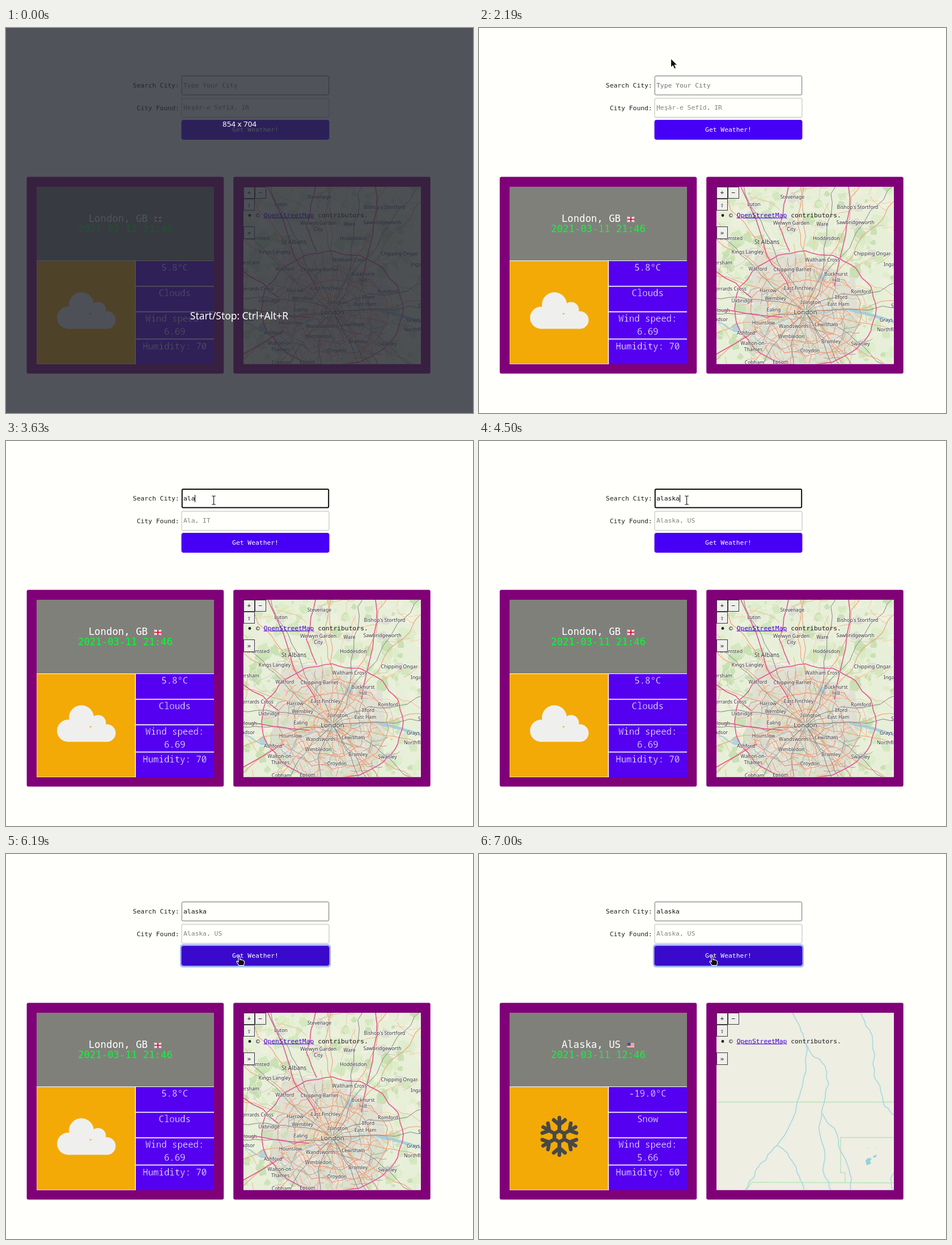
These frames come from a looping animation (824 by 679 pixels, 8 s). An HTML page:

```html
<!DOCTYPE html>
<html lang="en">
<head>
<meta charset="utf-8">
<title>City weather</title>
<style>
html, body { margin: 0; width: 100%; height: 100%; overflow: hidden; background: #fffffc; }
svg { display: block; }
#stage { width: 824px; height: 679px; font: 11.33px "DejaVu Sans Mono", monospace; fill: #1c1c1c; }
text { white-space: pre; }
.head { font-size: 17.33px; fill: #fff; }
/* The thin outline in the cell colour slims the letters */
.cell { font: 300 15.67px "Noto Sans Mono", "DejaVu Sans Mono", monospace; fill: #fff; stroke: #5500f0; stroke-width: .35px; text-anchor: middle; }
.place { font: 8.7px "Noto Sans", sans-serif; fill: #333; stroke: #fff; stroke-opacity: .6; stroke-width: 1.6px; paint-order: stroke; }
.hint { font-family: Ubuntu, "Noto Sans", sans-serif; fill: #fff; text-anchor: middle; }
.line { fill: none; stroke-linejoin: round; stroke-linecap: round; }
.mid { text-anchor: middle; }
.end { text-anchor: end; }
</style>
</head>
<body>
<svg id="stage" viewBox="0 0 824 679">
  <rect width="824" height="679" fill="#fffffc"/>

  <text class="end" x="305.7" y="105">Search City:</text>
  <text class="end" x="305.7" y="144.5">City Found:</text>
  <rect id="box" fill="#fffffc" rx="2"/>
  <rect x="310" y="124" width="260" height="33.5" rx="2" fill="#fffffc" stroke="#b9b9b7"/>
  <text id="query" x="313" y="105"></text>
  <text id="found" x="313" y="144" fill="#82827e"></text>
  <rect id="caret" y="95" width="1" height="13" fill="#000"/>
  <rect id="ring" x="308.5" y="160.5" width="263" height="38" rx="4" fill="none" stroke="#a3b4f6" stroke-width="3"/>
  <rect id="button" x="309.5" y="162" width="261" height="35" rx="4"/>
  <text class="mid" x="440" y="183.3" fill="#fff">Get Weather!</text>

  <g fill="#800078">
    <rect x="36.6" y="262.4" width="347.6" height="347" rx="3"/>
    <rect x="401.2" y="262.4" width="347.6" height="347" rx="3"/>
  </g>
  <rect x="54" y="280" width="313" height="313" fill="#fffffc"/>
  <rect x="54" y="280" width="313" height="130" fill="#80807b"/>
  <rect x="54.3" y="411" width="173.4" height="181.4" fill="#f3aa07"/>
  <g fill="#5500f0">
    <rect x="229" y="411" width="138" height="43.7"/>
    <rect x="229" y="456.4" width="138" height="43.2"/>
    <rect x="229" y="501.4" width="138" height="46.3"/>
    <rect x="229" y="549.4" width="138" height="43.6"/>
  </g>
  <text id="city" class="head" x="145.7" y="342"></text>
  <text id="date" class="head" x="127" y="360" style="fill:#00ff32"></text>
  <g id="flagGB">
    <rect x="261.5" y="333" width="12.5" height="9" fill="#c9c3de"/>
    <path d="M262 333l12 9M274 333l-12 9" stroke="#f4e4ea" stroke-width="1.6"/>
    <path d="M268 333v9M261.5 337.5h12.5" stroke="#fff" stroke-width="3.4"/>
    <path d="M268 333v9M261.5 337.5h12.5" stroke="#dc1030" stroke-width="2.2"/>
  </g>
  <g id="flagUS">
    <rect x="261.5" y="333" width="12.5" height="9" fill="#f4e6e6"/>
    <path d="M261.5 334h12.5m-12.5 2.5h12.5m-12.5 2.5h12.5m-12.5 2.5h12.5" stroke="#d84858"/>
    <rect x="261.5" y="333" width="6" height="5" fill="#40509c"/>
  </g>
  <text id="temp" class="cell" x="297.7" y="427.5"></text>
  <text id="sky" class="cell" x="297.7" y="473"></text>
  <text class="cell" x="297.7" y="518">Wind speed:</text>
  <text id="wind" class="cell" x="297.7" y="541"></text>
  <text id="humid" class="cell" x="297.7" y="566.5"></text>
  <g id="cloud" fill="#efefed">
    <circle cx="133" cy="488" r="22"/>
    <circle cx="162.5" cy="497" r="13.8"/>
    <circle cx="109.5" cy="511" r="19.5"/>
    <circle cx="178" cy="515" r="15.5"/>
    <rect x="109" y="505" width="69" height="25.5"/>
  </g>
  <g id="flake" class="line" transform="translate(141.8 498)" stroke="#484846" stroke-width="6.5"></g>

  <rect x="419" y="280" width="313" height="312.5" fill="#fffffc"/>
  <svg id="london" x="419" y="280" width="312.5" height="312.5" viewBox="419 280 312.5 312.5"></svg>
  <svg id="alaska" x="419" y="280" width="312.5" height="312.5" viewBox="419 280 312.5 312.5"></svg>
  <g fill="#efefec" stroke="#3a3a3a">
    <rect x="419.5" y="280.5" width="19" height="20"/>
    <rect x="439.5" y="280.5" width="19" height="20"/>
    <rect x="419.5" y="301.5" width="19" height="20"/>
    <rect x="419.5" y="350.5" width="19" height="21"/>
  </g>
  <g class="mid">
    <text x="429" y="293.5">+</text>
    <text x="449" y="293.5">−</text>
    <text x="429" y="316">⇧</text>
    <text x="429" y="365">»</text>
  </g>
  <circle cx="430" cy="330.5" r="2.4"/>
  <text x="441" y="333.5">© <tspan fill="#4400d8" text-decoration="underline">OpenStreetMap</tspan> contributors.</text>

  <path id="arrow" d="M0 0V15.5L3.6 12.2L6.2 18L9 16.8L6.5 11.2H11.3Z" fill="#111" stroke="#fff"/>
  <g id="beam" class="line">
    <path d="M-3 -7.5H3M-3 7.5H3M0 -7.5V7.5" stroke="#fff" stroke-width="3"/>
    <path d="M-3 -7.5H-1L0 -6.5L1 -7.5H3M-3 7.5H-1L0 6.5L1 7.5H3M0 -6.5V6.5" stroke="#222" stroke-width="1.2"/>
  </g>
  <path id="hand" d="M-1.4 1Q0 -.6 1.4 1V6.5Q3 5.6 4 7Q6 6.2 7 8Q9 8 9 10V13L8 16.5H-.5L-4.5 10.5Q-5 8.5 -3 9L-1.4 10.5Z" fill="#111" stroke="#fff" stroke-width="1.1"/>

  <g id="dim">
    <rect width="824" height="679" fill="rgb(38,40,50)" opacity=".8"/>
    <text class="hint" x="412" y="173.5" font-size="13.4">854 x 704</text>
    <text class="hint" x="411.5" y="514" font-size="17.4">Start/Stop: Ctrl+Alt+R</text>
  </g>
</svg>
<script>
const LOOP = 8000, TURN = Math.PI * 2;
const $ = id => document.getElementById(id);

function set(el, attrs) {
  for (const k in attrs) el.setAttribute(k, attrs[k]);
  return el;
}

function add(parent, tag, attrs, text = "") {
  const el = set(document.createElementNS("http://www.w3.org/2000/svg", tag), attrs);
  el.textContent = text;
  parent.append(el);
  return el;
}

let seed = 77;
function rnd() {
  seed = (seed * 16807) % 2147483647;
  return seed / 2147483647;
}
const spread = r => (rnd() * 2 - 1) * r;

function ellipse(cx, cy, rx, ry, n = 16) {
  return Array.from({ length: n + 1 }, (_, i) =>
    [cx + Math.cos(i / n * TURN) * rx, cy + Math.sin(i / n * TURN) * ry]);
}

// Midpoint displacement, for natural looking roads and rivers
function rough(pts, amount, depth) {
  if (!depth) return pts;
  const out = [pts[0]];
  for (let i = 1; i < pts.length; i++) {
    const [ax, ay] = pts[i - 1], [bx, by] = pts[i];
    const off = Math.hypot(bx - ax, by - ay) * amount;
    out.push([(ax + bx) / 2 + spread(off), (ay + by) / 2 + spread(off)], pts[i]);
  }
  return rough(out, amount, depth - 1);
}

const join = pts => "M" + pts.map(p => p.map(v => v.toFixed(1)).join(" ")).join("L");

function trail(map, pts, color, width, amount = 0.1, depth = 3) {
  add(map, "path", { d: join(rough(pts, amount, depth)), class: "line", stroke: color, "stroke-width": width });
}

function blob(map, x, y, r, color, opacity = 0.8) {
  const pts = ellipse(x, y, r, r, 8).slice(1).map(([px, py]) => [px + spread(r / 3), py + spread(r / 3)]);
  add(map, "path", { d: join(pts) + "Z", fill: color, opacity });
}

// Short wandering roads strewn around a point
function lanes(map, count, [cx, cy], reach, length, width, colors) {
  for (let i = 0; i < count; i++) {
    const x = cx + spread(reach), y = cy + spread(reach), a = rnd() * TURN, l = length * (0.5 + rnd());
    trail(map, [[x, y], [x + Math.cos(a) * l, y + Math.sin(a) * l]], colors[i % colors.length], width, 0.14);
  }
}

// Roads leaving a centre in even directions
function spokes(map, count, [cx, cy], from, to, width, color) {
  for (let i = 0; i < count; i++) {
    const a = i / count * TURN + spread(0.25);
    const pts = [from, (from + to) / 2, to].map(r => [cx + Math.cos(a) * r, cy + Math.sin(a) * r]);
    trail(map, pts, color, width);
  }
}

const places = [
  ["Luton", 485, 314], ["Stevenage", 553, 301], ["Bishop's Stortford", 668, 319],
  ["Welwyn Garden", 551, 347], ["City", 551, 358], ["Ware", 606, 349],
  ["Sawbridgeworth", 664, 346], ["Hoddesdon", 613, 374], ["Kings Langley", 474, 398],
  ["Chipping Ongar", 694, 401], ["Waltham Cross", 606, 412], ["Watford", 492, 428],
  ["Chipping Barnet", 553, 429], ["Buckhurst", 630, 437], ["Hill", 630, 448],
  ["Harrow", 510, 466], ["East Finchley", 564, 462], ["Romford", 674, 468],
  ["Ilford", 639, 478], ["Uxbridge", 464, 484], ["Wembley", 523, 480],
  ["Islington", 585, 487], ["East Ham", 634, 490], ["Ealing", 520, 500],
  ["Hounslow", 502, 523], ["Wandsworth", 555, 529], ["Lewisham", 613, 526],
  ["Ashford", 471, 541], ["Wimbledon", 551, 547], ["Bromley", 621, 556],
  ["Swanley", 673, 560], ["Walton-on-", 484, 559], ["Thames", 484, 570],
  ["Croydon", 584, 572], ["Cobham", 486, 593], ["Epsom", 532, 592]
];
const cutLeft = [["Berkhamsted", 465, 374], ["Amersham", 447, 417], ["Gerrards Cross", 472, 463],
  ["Slough", 443, 501], ["Windsor", 439, 517]];
const cutRight = [["Ingatestone", 714, 420], ["South Ockendon", 727, 493], ["Grays", 707, 518], ["Northfleet", 702, 535]];

function drawLondon() {
  const map = $("london"), hub = [576, 500], middle = [575, 436];
  add(map, "rect", { x: 419, y: 280, width: 313, height: 313, fill: "#e8efd9" });
  const greens = ["#cfe6ba", "#f0f1e0", "#c2deac", "#dcedc8"];
  for (let i = 0; i < 200; i++) {
    blob(map, middle[0] + spread(160), middle[1] + spread(160), 3 + rnd() * 10, greens[i % 4]);
  }
  blob(map, ...hub, 104, "#dfddd3");
  for (const [, x, y] of places) blob(map, x, y - 2, 9, "#dcdbd2");
  for (let i = 0; i < 110; i++) {
    blob(map, hub[0] + spread(115), hub[1] + spread(95), 1.5 + rnd() * 4.5, i % 3 ? "#c9e0b5" : "#efe9dd");
  }

  const thames = [[732, 518], [690, 506], [655, 497], [600, 503], [555, 514], [518, 522], [500, 556], [455, 535], [419, 512]];
  trail(map, thames.slice(0, 3), "#a6cede", 5, 0.04);
  trail(map, thames, "#a6cede", 2.2, 0.12);
  for (const [x, y] of [[604, 440], [453, 529]]) blob(map, x, y, 7, "#a6cede");

  lanes(map, 130, middle, 160, 45, 0.9, ["#f4cc96", "#c6c6b8", "#efb08a", "#f7f4e4"]);
  lanes(map, 100, hub, 85, 34, 1, ["#ec9a84", "#f3b67c", "#a3a29c"]);
  for (const r of [30, 62, 88]) trail(map, ellipse(...hub, r * 1.1, r * 0.9), "#ee9580", 1.2, 0.16, 2);
  spokes(map, 17, hub, 12, 290, 1.2, "#f0a57e");
  spokes(map, 13, hub, 4, 270, 1, "#83837e");

  const motorways = [
    ellipse(576, 495, 125, 102),
    [[462, 280], [508, 402], [550, 466]], [[546, 280], [530, 350], [548, 394]],
    [[652, 280], [647, 365], [627, 455]],
    [[419, 497], [535, 510]], [[419, 430], [480, 475]], [[419, 575], [490, 535]]
  ];
  for (const road of motorways) trail(map, road, "#e0588f", 1.6, 0.06, 2);

  const label = (anchor, size = 8.7) => ([name, x, y]) =>
    add(map, "text", { class: "place", x, y, "text-anchor": anchor, style: `font-size:${size}px` }, name);
  places.forEach(label("middle"));
  cutLeft.forEach(label("end"));
  cutRight.forEach(label("start"));
  label("middle", 10.2)(["St Albans", 508, 381]);
  label("middle", 11.6)(["London", 576, 505]);
}

function drawAlaska() {
  const map = $("alaska");
  add(map, "rect", { x: 419, y: 280, width: 313, height: 313, fill: "#eeeee3" });
  add(map, "path", { class: "line", stroke: "#c3e6c2", "stroke-width": 1.8,
    d: "M419 437.5H733M733 500H638V562H646V579M472 593L481 579L733 580" });
  const fork = [526, 514], bend = [577, 335];
  const rivers = [
    [[553, 280], bend, [577, 375], [561, 440], fork, [490, 555], [469, 593]],
    [fork, [558, 550], [573, 593]],
    [bend, [607, 370], [617, 405], [604, 505], [621, 593]],
    [[674, 280], [689, 310], [697, 390], [716, 445], [733, 462]],
    [[606, 458], [636, 520], [656, 593]],
    [[733, 560], [726, 572], [729, 593]]
  ];
  for (const river of rivers) trail(map, river, "#a9d8df", 1.7);
  add(map, "path", { fill: "#98d0dd", d: "M682 541L686 536L693 537L690 542L692 546L684 549ZM695 533L702 530L701 534L696 536Z" });
  add(map, "path", { class: "line", stroke: "#d8e5df", d: "M683 518h7m8 0h4" });
}

function drawFlake() {
  for (let a = 0; a < 360; a += 60) {
    add($("flake"), "path", { transform: `rotate(${a})`, d: "M0 -10V-33M-10 -29L0 -20.5L10 -29M0 -10L8.7 -5" });
  }
}

const KEYS = [3190, 3500, 3630, 4060, 4310, 4500];
const FOUND = ["Ḩeşār-e Sefīd, IR", "Amphoe Mueang Phayao, TH", "Aladizgeh, IR", "Ala, IT",
  "Alasandra, IN", "Shalaski, UA", "Alaska, US"];
const BEATS = [2190, 2310, 2440, 2500, 2630, 5380, 5440, 5500, 5560, 5630, 5750];
const FOCUS = 3000, CLICK = 6190, REPLY = 6380;
const REPORT = {
  city: ["London, GB", "Alaska, US"],
  date: ["2021-03-11 21:46", "2021-03-11 12:46"],
  temp: ["5.8°C", "-19.0°C"],
  sky: ["Clouds", "Snow"],
  wind: ["6.69", "5.66"],
  humid: ["Humidity: 70", "Humidity: 60"]
};

const ramp = (t, from, to) => Math.min(1, Math.max(0, (t - from) / (to - from)));
const show = (id, on) => set($(id), { visibility: on ? "visible" : "hidden" });

// The pointer drops into the search box, later slows down towards the button.
function pointerAt(t) {
  const beat = Math.max(0, ...BEATS.filter(b => b <= t));
  const a = ramp(beat, 2190, 2630), b = ramp(beat, 5300, 5750);
  const x = 338.5 + 28 * a + 45 * b;
  const y = 54 + 50.5 * a + 75.5 * (1 - (1 - b) ** 1.31);
  const shape = !beat ? "" : y > 162 ? "hand" : y > 84 && y < 118 ? "beam" : "arrow";
  return { x, y, shape };
}

function render(t) {
  const { x, y, shape } = pointerAt(t);
  for (const id of ["arrow", "beam", "hand"]) {
    show(id, id === shape);
    set($(id), { transform: `translate(${x} ${y})` });
  }

  const typed = KEYS.filter(k => k <= t).length;
  $("query").textContent = typed ? "alaska".slice(0, typed) : "Type Your City";
  set($("query"), { fill: typed ? "#111" : "#70706d" });
  $("found").textContent = FOUND[typed];
  show("caret", t >= FOCUS && t < 5130);
  set($("caret"), { x: 313 + Math.round(typed * 6.82) });

  const focus = t >= FOCUS && t < CLICK;
  const inset = focus ? 1 : 0.5;
  set($("box"), {
    x: 309.7 + inset, y: 84 + inset, width: 260.5 - 2 * inset, height: 34.5 - 2 * inset,
    stroke: focus ? "#0c0c0c" : shape === "beam" ? "#505050" : "#6d6d6d", "stroke-width": inset * 2
  });
  set($("button"), { fill: shape === "hand" ? "#390acb" : "#4700f5" });
  show("ring", t >= CLICK);

  for (const id in REPORT) $(id).textContent = REPORT[id][+(t >= REPLY)];
  show("flagGB", t < REPLY + 60);
  show("flagUS", t >= REPLY + 60);
  show("cloud", t < REPLY + 120);
  show("flake", t >= REPLY + 120);
  show("london", t < REPLY);
  set($("alaska"), { opacity: t < 7000 ? 0.8 * Math.floor(ramp(t, 6500, 6690) * 3) / 3 : 1 });
  show("dim", t < 500);
}

drawLondon();
drawAlaska();
drawFlake();

function tick() {
  render(performance.now() % LOOP);
  requestAnimationFrame(tick);
}
tick();
</script>
</body>
</html>
```
